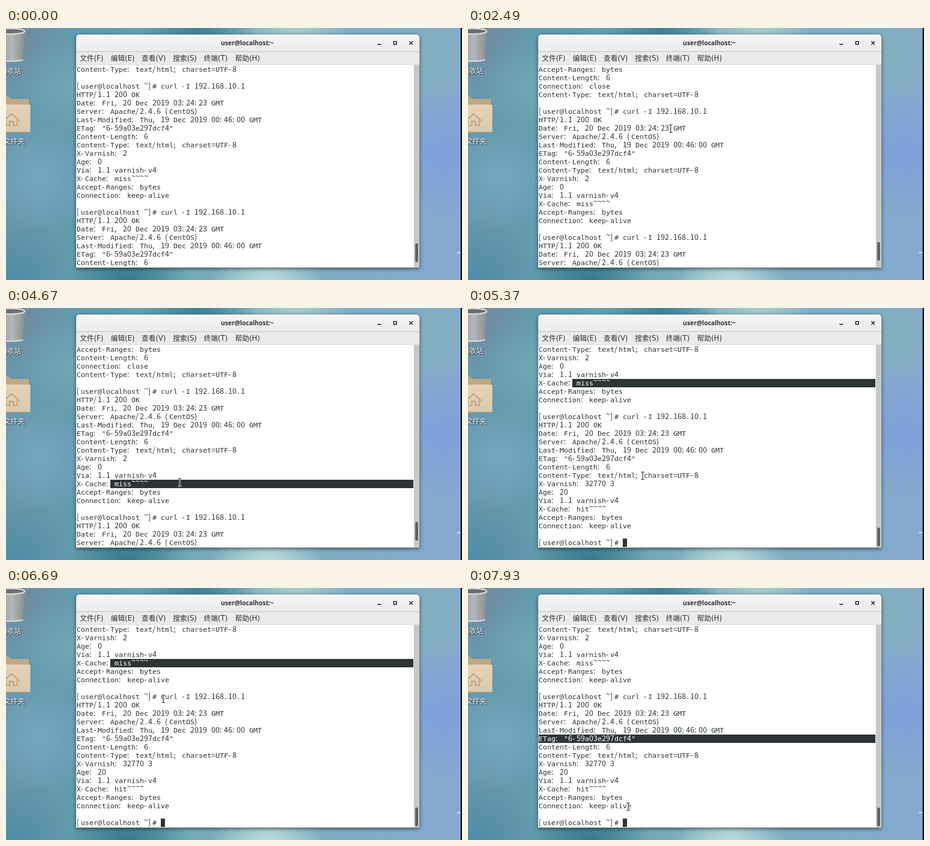
An HTML page with a canvas for the animation above (8000 ms loop, 975x540 px).

```html
<!DOCTYPE html>
<html lang="zh">
<head>
<meta charset="utf-8">
<title>Terminal</title>
<style>
html, body { margin: 0; width: 100%; height: 100%; overflow: hidden; background: #6c9cae; }
canvas { display: block; width: 975px; height: 540px; }
</style>
</head>
<body>
<canvas id="stage" width="975" height="540"></canvas>
<script>
const W = 975, H = 540, LOOP = 8000, STEP = 77;
const LEFT = 151, TOP = 80, CELL = 9, ROW = 18, ROWS = 24, EDGE = 871;
const INK = '#2e3436', PAPER = '#ffffff';
const MONO = '14.95px "DejaVu Sans Mono", monospace';
const THIN = '300 16px "Noto Sans CJK SC", "Noto Sans CJK", "Noto Sans", sans-serif';
const UI = '15px "DejaVu Sans", "Noto Sans CJK SC", "Noto Sans CJK", sans-serif';
const LABEL = '15px "Noto Sans CJK SC", "Noto Sans CJK", sans-serif';

const ctx = document.getElementById('stage').getContext('2d');

// ---- terminal buffer ----
const prompt = '[user@localhost ~]# ';
const reply = (ids, age, cache) => [
  prompt + 'curl -I 192.168.10.1',
  'HTTP/1.1 200 OK',
  'Date: Fri, 20 Dec 2019 03:24:23 GMT',
  'Server: Apache/2.4.6 (CentOS)',
  'Last-Modified: Thu, 19 Dec 2019 00:46:00 GMT',
  'ETag: "6-59a03e297dcf4"',
  'Content-Length: 6',
  'Content-Type: text/html; charset=UTF-8',
  'X-Varnish: ' + ids,
  'Age: ' + age,
  'Via: 1.1 varnish-v4',
  'X-Cache: ' + cache + '~~~~',
  'Accept-Ranges: bytes',
  'Connection: keep-alive',
  ''
];
const lines = [
  'Accept-Ranges: bytes', 'Content-Length: 6', 'Connection: close',
  'Content-Type: text/html; charset=UTF-8', '',
  ...reply('2', '0', 'miss'), ...reply('32770 3', '20', 'hit'), prompt
];

// ---- motion ----
const entry = [803, 517];
const glide = (start, end, x, y) => ({ start, end, x, y });
const glides = [
  glide(70, 420, 469, 262), glide(420, 620, 505, 267),
  glide(860, 1090, 543, 253), glide(1400, 1700, 539, 253),
  glide(2110, 2880, 326, 177),
  glide(2970, 3350, 527, 223), glide(3350, 3740, 435, 346),
  glide(3810, 4120, 227, 377), glide(4120, 4430, 299, 375), glide(4500, 4670, 371, 373),
  glide(5300, 5590, 380, 316),
  glide(5670, 5990, 502, 238), glide(5990, 6690, 336, 237),
  glide(6850, 7004, 155, 323), glide(7004, 7312, 400, 323),
  glide(7312, 7620, 480, 406), glide(7620, 7930, 342, 468)
];
const drags = [
  { from: 4120, to: 4670, line: 16, col: 8 },
  { from: 7004, to: 7312, line: 25, col: 0 }
];

// Each glide advances in even steps and lands on its end point.
function pointerAt(t) {
  if (t < glides[0].start) return null;
  let [x, y] = entry;
  for (const g of glides) {
    if (t < g.start) break;
    const span = g.end - g.start;
    const steps = Math.round(span / STEP);
    const k = Math.min(1, Math.floor((t - g.start) / span * steps + 0.2) / steps);
    x += (g.x - x) * k;
    y += (g.y - y) * k;
  }
  return [Math.round(x), Math.round(y)];
}

// The wheel moves three lines per notch.
function firstLine(t) {
  if (t < 1880) return 3;
  if (t < 4820) return 0;
  return Math.min(12, 3 + 3 * Math.floor((t - 4820) / STEP));
}

function selectionAt(t) {
  const drag = drags.filter(d => d.from <= t).pop();
  if (!drag) return null;
  const x = pointerAt(Math.min(t, drag.to))[0];
  const x0 = LEFT + drag.col * CELL;
  const textEnd = LEFT + lines[drag.line].length * CELL;
  const x1 = x > textEnd ? EDGE : LEFT + Math.round((x - LEFT) / CELL) * CELL;
  return x1 > x0 ? { line: drag.line, x0, x1 } : null;
}

// ---- drawing helpers ----
function rect(c, x, y, w, h, fill) {
  c.fillStyle = fill;
  c.fillRect(x, y, w, h);
}

function round(c, x, y, w, h, r, fill) {
  c.beginPath();
  c.roundRect(x, y, w, h, r);
  c.fillStyle = fill;
  c.fill();
}

function trace(c, points) {
  c.beginPath();
  points.forEach(([x, y]) => c.lineTo(x, y));
}

function linear(c, x0, y0, x1, y1, ...colors) {
  const g = c.createLinearGradient(x0, y0, x1, y1);
  colors.forEach((color, i) => g.addColorStop(i / (colors.length - 1), color));
  return g;
}

function glow(c, x, y, r, color) {
  const g = c.createRadialGradient(x, y, 0, x, y, r);
  g.addColorStop(0, color);
  g.addColorStop(1, color + '00');
  rect(c, x - r, y - r, 2 * r, 2 * r, g);
}

function caption(c, text, x, y) {
  c.save();
  c.font = LABEL;
  c.textAlign = 'center';
  c.shadowColor = '#000';
  c.shadowBlur = 2;
  c.shadowOffsetX = c.shadowOffsetY = 1;
  c.fillStyle = '#fff';
  c.fillText(text, x, y);
  c.restore();
}

// ---- desktop ----
function wallpaper(c) {
  rect(c, 0, 0, W, H, linear(c, 0, 0, W, 0, '#6897ab', '#5f9fb0', '#7db1bd', '#80adc6', '#86a9d0'));
  glow(c, 0, 0, 140, '#74879c');
  glow(c, 135, 130, 110, '#70a8b2');
  glow(c, 70, 320, 120, '#74a9c4');
  glow(c, 20, 540, 130, '#4f8ca6');
  glow(c, 260, 560, 130, '#337488');
  glow(c, 410, -20, 130, '#38798e');
  glow(c, 620, -20, 120, '#b0d0d0');
  glow(c, 560, 560, 120, '#c4e2e0');
  glow(c, 905, 60, 110, '#82b0b8');
  glow(c, 940, 270, 140, '#7d9fda');
  rect(c, 964, 480, 8, 3, '#c9d6d8');
  rect(c, 972, 0, 3, H, '#000');
}

function trash(c) {
  c.save();
  trace(c, [[-20, 6], [40, 6], [36, 70], [-16, 70]]);
  c.fillStyle = linear(c, -15, 0, 40, 0, '#8b9092', '#a9aeb0', '#777d80');
  c.fill();
  c.clip();
  c.strokeStyle = 'rgba(220,225,225,.35)';
  c.beginPath();
  for (let x = -60; x < 80; x += 4) {
    for (const lean of [-30, 30]) {
      c.moveTo(x, 8);
      c.lineTo(x + lean, 70);
    }
  }
  c.stroke();
  c.restore();
  c.strokeStyle = '#d5d9d9';
  c.lineWidth = 3;
  c.beginPath();
  c.ellipse(10, 67, 26, 4, 0, 0, Math.PI);
  c.stroke();
  c.beginPath();
  c.ellipse(10, 7, 30, 6, 0, 0, Math.PI * 2);
  c.fillStyle = '#6a7072';
  c.fill();
  c.stroke();
  caption(c, '回收站', 10, 97);
}

function folder(c) {
  trace(c, [[-9, 146], [3, 146], [10, 152], [49, 152], [49, 170], [-9, 170]]);
  c.fillStyle = '#bfa985';
  c.fill();
  round(c, -40, 164, 92, 60, 3, linear(c, 0, 164, 0, 224, '#e4d3b8', '#dcc9ab'));
  rect(c, -30, 222, 80, 2, '#c3ad8b');
  c.strokeStyle = '#bfa985';
  c.lineWidth = 3;
  trace(c, [[-5, 199], [12, 184], [29, 199]]);
  c.stroke();
  trace(c, [[0, 197], [0, 209], [8, 209], [8, 200], [16, 200], [16, 209], [24, 209], [24, 197]]);
  c.stroke();
  caption(c, '主文件夹', 10, 248);
}

function windowFrame(c) {
  const corners = [7, 7, 0, 0];
  c.save();
  c.shadowColor = 'rgba(0,0,0,.55)';
  c.shadowBlur = 9;
  c.shadowOffsetY = 2;
  round(c, 150, 14, 734, 500, corners, '#ebebe9');
  c.restore();
  round(c, 150, 14, 734, 36, corners, linear(c, 0, 14, 0, 50, '#f5f5f4', '#ececea'));
  rect(c, 150, 50, 734, 1, '#b4b8b6');
  rect(c, 150, 78, 734, 1, '#d5d7d5');
  rect(c, 150, 79, 722, 434, PAPER);
  rect(c, 872, 79, 12, 434, '#c6cac8');
  rect(c, 150, 513, 734, 1, '#8c9a9d');

  c.fillStyle = c.strokeStyle = INK;
  c.textAlign = 'center';
  c.font = 'bold 13.3px "Open Sans", "Noto Sans", sans-serif';
  c.fillText('user@localhost:~', 516, 37);

  c.fillRect(794, 34, 8, 2);
  c.lineWidth = 2;
  c.strokeRect(829, 29, 6, 6);
  for (const s of [-3.5, 3.5]) {
    trace(c, [[866 - s, 28.5], [866 + s, 35.5]]);
    c.stroke();
  }

  c.textAlign = 'left';
  c.font = UI;
  ['文件(F)', '编辑(E)', '查看(V)', '搜索(S)', '终端(T)', '帮助(H)']
    .forEach((text, i) => c.fillText(text, 158 + Math.floor(i * 66.4), 70));
}

const desktop = document.createElement('canvas');
desktop.width = W;
desktop.height = H;
const back = desktop.getContext('2d');
[wallpaper, trash, folder, windowFrame].forEach(draw => draw(back));

// ---- live parts ----
// Letters come from the mono face, digits and marks from a lighter fallback.
function drawLine(text, top, color) {
  ctx.fillStyle = color;
  for (const [, thin, word, at] of split(text)) {
    ctx.font = thin ? THIN : MONO;
    const dx = thin === '.' ? 2 : 0;
    const dy = thin === '~' ? 9 : 14;
    ctx.fillText(thin || word, LEFT + at * CELL + dx, top + dy);
  }
}

function split(text) {
  const runs = text.matchAll(/([0-9[\]():;.,\/=~-])|([^0-9[\]():;.,\/=~\s-]+)/g);
  return Array.from(runs, m => [m[0], m[1], m[2], m.index]);
}

function drawSelection({ line, x0, x1 }, first) {
  const top = TOP + (line - first) * ROW;
  if (line < first || line >= first + ROWS) return;
  ctx.save();
  ctx.beginPath();
  ctx.rect(x0, top, x1 - x0, ROW);
  ctx.clip();
  rect(ctx, x0, top, x1 - x0, ROW, INK);
  drawLine(lines[line], top, PAPER);
  ctx.restore();
}

function outline(width, color) {
  ctx.lineWidth = width;
  ctx.strokeStyle = color;
  ctx.stroke();
}

function drawBeam(x, y) {
  ctx.beginPath();
  for (const s of [-7.5, 8.5]) {
    ctx.moveTo(x - 3, y + s);
    ctx.lineTo(x + 4, y + s);
  }
  ctx.moveTo(x + 0.5, y - 8);
  ctx.lineTo(x + 0.5, y + 9);
  outline(3, '#fff');
  outline(1.2, '#000');
}

function drawArrow(x, y) {
  const shape = [[0, 0], [0, 16], [4, 12.5], [7, 18], [9.5, 17], [7, 11.5], [12, 11.5], [0, 0]];
  trace(ctx, shape.map(([dx, dy]) => [x + dx, y + dy]));
  ctx.fillStyle = '#000';
  ctx.fill();
  outline(1, '#fff');
}

function render(t) {
  const first = firstLine(t);
  ctx.drawImage(desktop, 0, 0);
  lines.slice(first, first + ROWS).forEach((text, i) => drawLine(text, TOP + i * ROW, INK));

  const caretRow = lines.length - 1 - first;
  if (caretRow < ROWS) rect(ctx, LEFT + prompt.length * CELL, TOP + caretRow * ROW, CELL, ROW, INK);

  const sel = selectionAt(t);
  if (sel) drawSelection(sel, first);

  round(ctx, 875, 458.5 + first, 6, 40, 3, '#5c6264');

  const pos = pointerAt(t);
  if (pos) (pos[1] > 513 ? drawArrow : drawBeam)(...pos);
}

const begin = performance.now();
function tick() {
  render((performance.now() - begin) % LOOP);
  requestAnimationFrame(tick);
}
tick();
</script>
</body>
</html>
```
